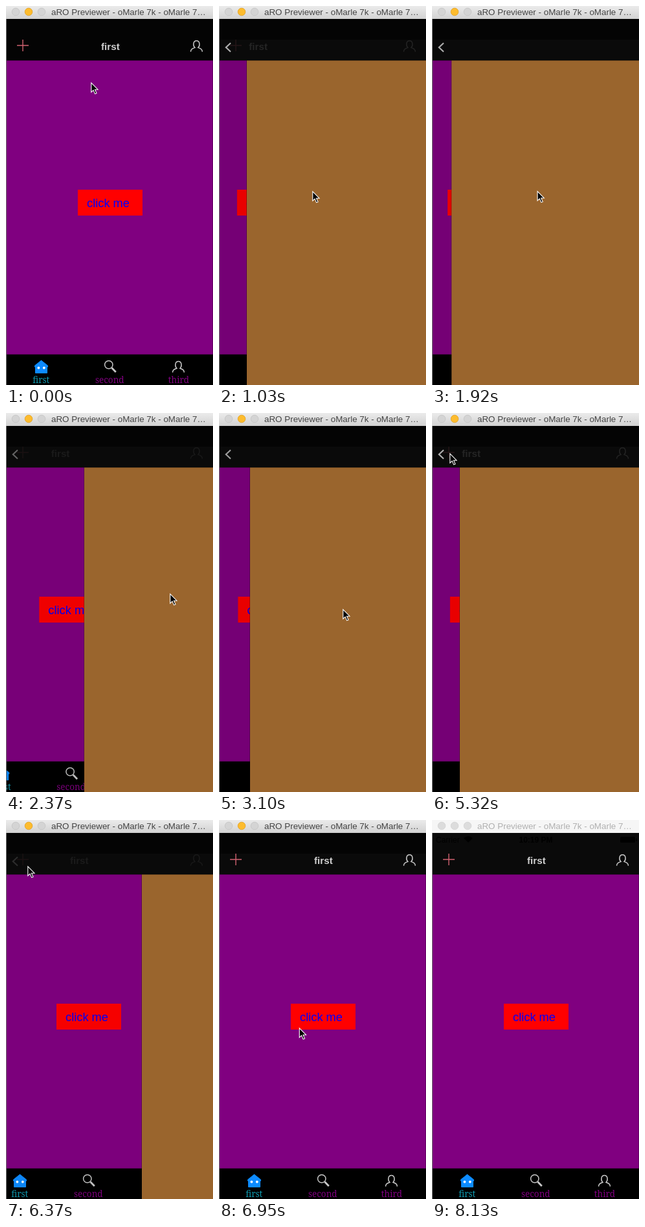
An HTML page for the animation above (8270 ms loop, 320 by 586 pixels).

```html
<!DOCTYPE html>
<html lang="en">
<head>
<meta charset="utf-8">
<title>Navigation demo</title>
<style>
  html, body { margin: 0; width: 100%; height: 100%; overflow: hidden; background: #000; }
  svg { display: block; width: 100vw; height: 100vh; }
  text { font-family: "Liberation Sans", Arial, sans-serif; }
  .tab { font-family: "Noto Serif", serif; font-size: 13.5px; text-anchor: middle; }
  .line { fill: none; stroke: #c8c8c8; stroke-width: 1.5; }
  .off circle { fill: #dcdcdc; stroke: #d2d2d2; }
  .off text { fill: #b0b0b0; }
  .off rect { fill: #f6f6f6; }
</style>
</head>
<body>
<svg viewBox="0 0 320 586" preserveAspectRatio="none">
  <defs>
    <linearGradient id="chrome" x2="0" y2="1">
      <stop stop-color="#ebebeb"/><stop offset="1" stop-color="#d2d2d2"/>
    </linearGradient>
    <path id="person" class="line" d="M-9 8.8C-8.8 5-7 4-2.6 2.4C-5.6-.4-5.6-8.2 0-8.2S5.6-.4 2.6 2.4C7 4 8.8 5 9 8.8"/>
  </defs>

  <rect width="320" height="586"/>
  <g id="under">
    <rect y="84" width="420" height="455" fill="#800080"/>
    <rect y="538" width="420" height="1" opacity=".3"/>
    <rect x="111" y="284" width="100" height="40" fill="#f00"/>
    <text x="125" y="310.5" font-size="18.3" fill="#00f">click me</text>
    <path d="M54.5 548L64.5 556V558H63.5V567.5H45.5V558H44.5V556Z"
      fill="#0d8bff" stroke="#0d8bff" stroke-linejoin="round"/>
    <g fill="#fff"><circle cx="50.4" cy="559.5" r="1.9"/><circle cx="58.8" cy="559.5" r="1.9"/></g>
    <g class="line">
      <circle cx="158.8" cy="554.6" r="6.2"/>
      <path d="M163.5 559.5L169.8 566" style="stroke-width:2.8"/>
    </g>
    <use href="#person" x="266.5" y="557.8"/>
    <text class="tab" x="54.3" y="583" fill="#0e9ab0">first</text>
    <text class="tab" x="160.3" y="583" fill="#800080">second</text>
    <text class="tab" x="267" y="583" fill="#800080">third</text>
  </g>
  <rect id="dim" y="84" width="320" height="502"/>
  <g id="page">
    <rect x="-1" y="84" width="1" height="502" opacity=".25"/>
    <rect y="84" width="320" height="502" fill="#9a652d"/>
  </g>

  <rect y="84" width="320" height="1" opacity=".3"/>
  <rect y="20" width="320" height="64" fill="#040404"/>
  <rect id="strip" width="320" fill="#0a0a0a"/>
  <g id="status" font-size="12">
    <text x="6" y="35">Carrier</text>
    <text x="160.5" y="35" font-weight="bold" text-anchor="middle">10:19 PM</text>
    <path d="M56 35L49 28Q56 22 63 28Z"/>
    <rect x="291" y="26" width="23" height="9" rx="1.5"/><rect x="315" y="28.5" width="2" height="4"/>
  </g>
  <path id="plus" d="M17 61H35M26 52V70" stroke="#cf6270" stroke-width="1.4"/>
  <text id="heading" y="68" font-size="15.2" font-weight="bold" fill="#cfcfcf">first</text>
  <use id="user" href="#person" x="294.5" y="62"/>
  <path id="back" class="line" style="stroke-width:2.2" d="M18 57.3L10.8 64L18 70.7"/>

  <rect y="20" width="1" height="566" fill="#6c6c6c"/>
  <g id="window">
    <rect width="320" height="20" fill="url(#chrome)"/>
    <g stroke="#c3c3c3" stroke-width=".8" fill="#d4d4d4">
      <circle cx="15" cy="9" r="5.8"/>
      <circle cx="35" cy="9" r="5.8" fill="#fdbc2e" stroke="#dfa023"/>
      <circle cx="55" cy="9" r="5.8"/>
    </g>
    <text x="70" y="14" font-size="13.4" fill="#444">aRO Previewer - oMarle 7k - oMarle 7…</text>
  </g>
  <path id="cursor" d="M.8 .8V15.2L4.1 12.1L6.6 17.9L9 16.9L6.5 11.2H11Z" stroke="#fff" stroke-width="1.1"/>
</svg>
<script>
const LOOP = 8270, TICK = 147.9, WIDTH = 320;
const $ = id => document.getElementById(id);

// The page either springs from one edge to another or follows the cursor from where it was grabbed.
const phases = [
  { at: 0, from: WIDTH, to: WIDTH },
  { at: 5.6, from: WIDTH, to: 0, push: true },
  { at: 12, grab: 132 },
  { at: 17.4, from: 121, to: 0 },
  { at: 20, grab: 143 },
  { at: 22.4, from: 96, to: WIDTH },
  { at: 34.6, from: WIDTH, to: 0, push: true },
  { at: 42.1, from: 0, to: WIDTH }
];

const glides = [
  { start: 0, end: 5, x: 144, y: 286 },
  { start: 9, end: 11, x: 132, y: 288 },
  { start: 12, end: 16, x: 253, y: 279 },
  { start: 17, end: 20, x: 143, y: 302 },
  { start: 20, end: 22, x: 239, y: 304 },
  { start: 22, end: 25, x: 197, y: 254 },
  { start: 28, end: 32, x: 27, y: 62 },
  { start: 37, end: 40, x: 33, y: 71 },
  { start: 44, end: 50, x: 214, y: 571 },
  { start: 50, end: 52, x: 214, y: 590 }
];

const clamp = v => Math.min(1, Math.max(0, v));
const spring = s => (1 + 2.5 * s) * Math.exp(-2.5 * s);
const move = (id, x, y = 0) => $(id).setAttribute('transform', `translate(${x} ${y})`);
const fade = (id, alpha) => $(id).setAttribute('opacity', alpha);

function cursorAt(tick) {
  return glides.reduce((p, g) => {
    const f = clamp((tick - g.start) / (g.end - g.start));
    return { x: p.x + (g.x - p.x) * f, y: p.y + (g.y - p.y) * f };
  }, { x: 131, y: 118 });
}

function pageAt(phase, tick, cursor) {
  if (phase.grab) return Math.max(0, cursor.x - phase.grab);
  return Math.round(phase.to + (phase.from - phase.to) * spring(tick - phase.at));
}

function popFade(cover) {
  if (cover > 0.8) return 0;
  return cover > 0.3 ? 0.08 : 1 - 3 * cover;
}

function render(time) {
  const tick = Math.floor((time % LOOP + 10) / TICK);
  const phase = phases.findLast(p => p.at <= tick);
  const cursor = cursorAt(tick);
  const x = pageAt(phase, tick, cursor);
  const cover = 1 - x / WIDTH;
  const inactive = tick >= 55;

  move('page', x);
  move('under', -96 * cover);
  fade('dim', 0.1 * cover);
  move('cursor', cursor.x, cursor.y);
  fade('cursor', tick < 52 ? 1 : 0);

  const items = phase.push ? 1 - cover : popFade(cover);
  const pressed = tick === 33 || tick === 34;
  $('heading').setAttribute('x', 147 - 113 * cover ** 0.8);
  fade('heading', items);
  fade('user', items);
  fade('plus', pressed ? 0.3 : items);
  fade('back', phase.push ? cover : cover ** 1.6);

  const top = inactive ? 20 : 52;
  $('strip').setAttribute('y', top);
  $('strip').setAttribute('height', tick ? 84 - top : 0);
  fade('status', inactive ? 1 : 0);
  $('window').setAttribute('class', inactive ? 'off' : '');
}

const start = performance.now();
function frame() {
  render(performance.now() - start);
  requestAnimationFrame(frame);
}
frame();
</script>
</body>
</html>
```
